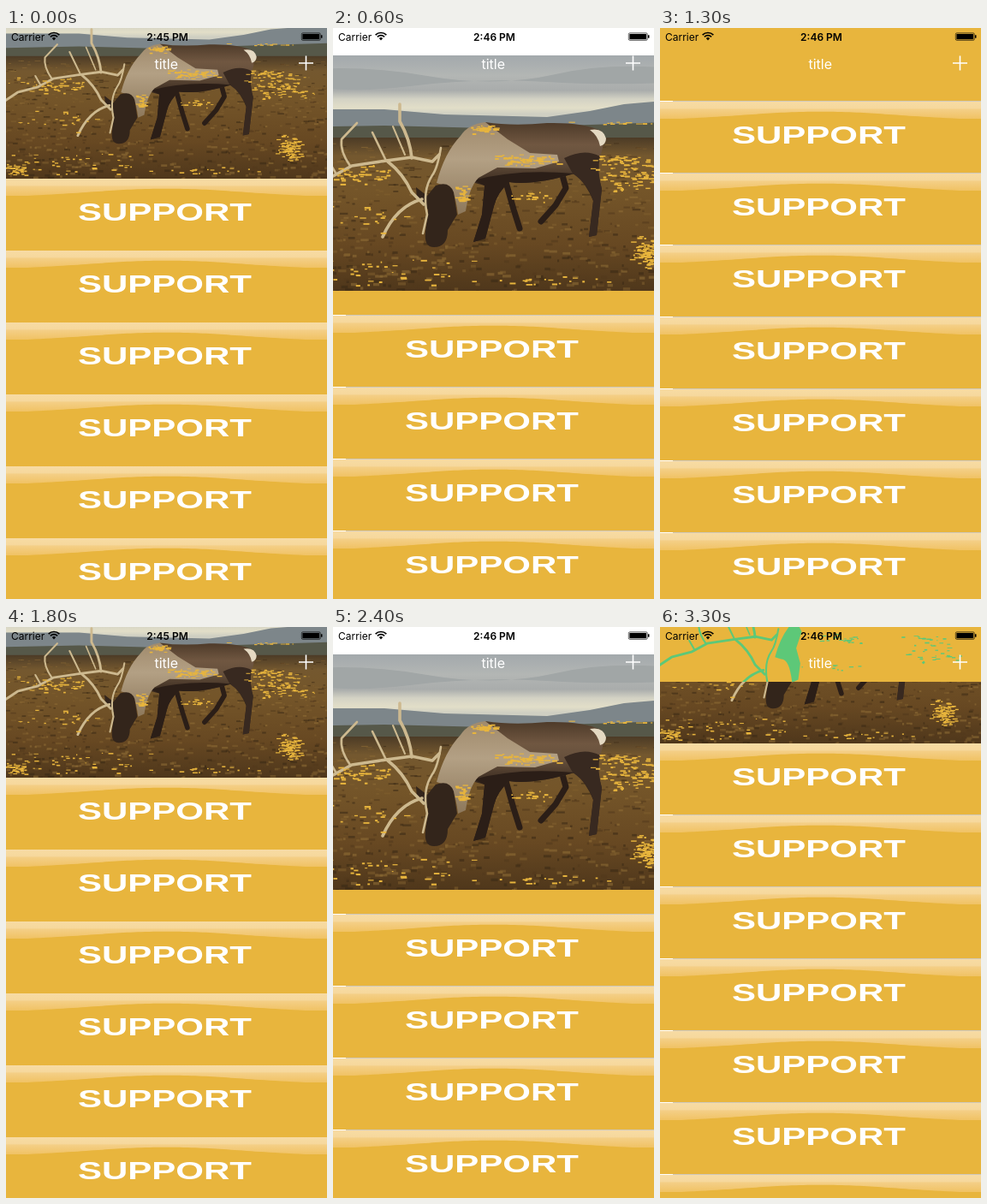
An HTML page with a canvas that plays this animation: 375x667 px, repeating every 3.4 s.

```html
<!DOCTYPE html>
<html lang="en">
<head>
<meta charset="utf-8">
<title>Stretchy header list</title>
<style>
html, body { margin: 0; width: 100%; height: 100%; overflow: hidden; background: #fff; }
canvas { display: block; width: 375px; height: 667px; }
</style>
</head>
<body>
<canvas id="stage"></canvas>
<script>
const W = 375, H = 667, ROW = 84, HEADER = 176, NAV = 64;
const STEP = 100, LOOP = 34, GOLD = '#e8b53d';
const canvas = document.getElementById('stage');
const c = canvas.getContext('2d');
const ratio = window.devicePixelRatio || 1;
canvas.width = W * ratio;
canvas.height = H * ratio;

// List offset for each step of one pull down and scroll up.
const scroll = [0, 8, 28, 50, 66, 74, 76, 40, -20, -88, -150, -190, -196, -174, -112, -40, -12, -3];

function seeded(n) {
  return () => (n = (n * 16807) % 2147483647) / 2147483647;
}

function gradient(y0, y1, stops) {
  const g = c.createLinearGradient(0, y0, 0, y1);
  stops.forEach(([at, color]) => g.addColorStop(at, color));
  return g;
}

function rect(x, y, w, h, fill) {
  c.fillStyle = fill;
  c.fillRect(x, y, w, h);
}

function shape(d, fill) {
  c.fillStyle = fill;
  c.fill(new Path2D(d));
}

function stroke(d, color, width) {
  c.strokeStyle = color;
  c.lineWidth = width;
  c.stroke(new Path2D(d));
}

function text(str, x, y, font, color, align = 'left') {
  c.font = font;
  c.fillStyle = color;
  c.textAlign = align;
  c.fillText(str, x, y);
}

const throat = 'M151 126 Q130 146 121 181 L130 184 Q142 183 146 218 L155 214 L158 190 L152 168 L160 144 Z';
const antlers = [
  ['M-48 193 L-30 181 L0 173 L22 161 L62 155 L92 151 L116 156 L124 148', 3.6],
  ['M64 156 Q82 170 92 192 L106 206', 3.6],
  ['M104 200 Q74 208 58 244', 3.6],
  ['M92 152 Q90 130 78 109 L78 89', 3.6],
  ['M62 155 L46 122', 2.6],
  ['M84 148 L70 115', 2],
  ['M20 161 Q8 144 10 130 L28 111', 2.6],
  ['M4 171 L-4 157', 2.6],
  ['M126 140 Q122 164 116 172 Q104 190 110 218 L105 240', 2.6]
];

// Centre x, centre y, half width, half height, count.
const patches = [
  [352, 172, 60, 22, 95], [330, 153, 32, 6, 25], [366, 262, 20, 19, 110],
  [20, 170, 66, 14, 55], [230, 197, 42, 7, 18], [-34, 293, 22, 10, 40],
  [60, 285, 120, 18, 45], [250, 295, 80, 8, 18], [28, 225, 70, 20, 22],
  [225, 154, 40, 7, 65], [175, 118, 18, 7, 34], [150, 198, 8, 16, 26],
  [330, 111, 70, 2, 12]
];

function flecks(color, share = 1) {
  const rnd = seeded(71);
  const spread = () => rnd() + rnd() - 1;
  c.fillStyle = color;
  for (const [x, y, rx, ry, n] of patches) {
    for (let i = 0; i < n * share; i++) {
      c.fillRect(x + spread() * rx, y + spread() * ry, 1.5 + rnd() * 6, 1 + rnd() * 1.2);
    }
  }
}

function drawAntlers(color) {
  c.lineCap = c.lineJoin = 'round';
  antlers.forEach(([d, width]) => stroke(d, color, width));
}

function drawLand() {
  rect(-50, 30, 475, 100, gradient(32, 100, [
    [0, '#a3a9ac'], [.35, '#b3b6b4'], [.6, '#a9acab'], [.75, '#d3d2c4'], [.9, '#e2dec8'], [1, '#cfcfc2']
  ]));
  shape('M-50 50 Q30 42 110 56 T260 54 T425 50 V62 Q330 68 250 63 T90 68 T-50 64Z', '#a1a6a6');
  shape('M-50 95 L60 95 L130 101 L210 103 L250 104 L300 97 L340 89 L425 82 V128 H-50Z', '#7d868a');
  shape('M-50 116 L60 114 L180 117 L300 113 L425 109 V137 H-50Z', '#565849');
  rect(-50, 128, 475, 181, gradient(128, 307, [
    [0, '#4c3b26'], [.12, '#74582f'], [.35, '#745529'], [.7, '#674822'], [1, '#4f371b']
  ]));
  const rnd = seeded(19);
  const tones = ['#3a2815', '#936f38', '#523a1d', '#80602f'];
  c.globalAlpha = .55;
  for (let i = 0; i < 900; i++) {
    const y = 134 + rnd() * 173;
    rect(-50 + rnd() * 475, y, 2 + rnd() * 8, 1 + (y - 130) / 70, tones[i % 4]);
  }
  c.globalAlpha = 1;
}

function drawDeer() {
  const dark = '#2b1e17';
  c.lineCap = c.lineJoin = 'round';
  stroke('M268 172 L272 187 L260 207 L243 226', dark, 7);
  stroke('M202 180 L211 212 L218 234', dark, 7);
  shape('M178 110 Q210 115 250 111 Q292 110 313 120 Q319 132 312 150 Q308 168 314 188 L308 242 L299 244 L304 202 Q296 182 282 170 Q235 184 206 180 Q192 192 188 208 L178 246 L164 250 L174 218 L177 184 L162 180 Q150 150 178 110Z',
    gradient(110, 185, [[0, '#4d3a29'], [.35, '#705741'], [.6, '#66503c'], [1, '#33251b']]));
  shape('M270 152 Q294 140 312 150 Q308 168 314 188 L308 242 L299 244 L304 202 Q298 182 280 170Z', '#382920');
  shape('M164 178 Q215 164 282 170 Q235 184 206 180 Q192 192 188 208 L178 246 L164 250 L174 218 L177 184Z', dark);
  shape('M178 110 Q158 112 149 126 Q130 146 121 181 L130 184 Q142 183 146 218 L155 214 Q159 186 170 175 L192 163 L236 164 L264 156 L262 148 L230 146 L204 130 Z',
    gradient(110, 218, [[0, '#a08a6c'], [.4, '#b3a084'], [1, '#8d785b']]));
  shape('M300 119 Q316 116 319 129 Q319 136 312 138 Q310 126 300 119Z', '#e4d9c2');
  shape('M120 184 Q136 178 141 192 L145 218 L134 236 Q134 256 118 256 Q106 256 108 238 L111 212 L98 200 L97 186 L110 196Z', '#33251b');
  drawAntlers('#cdb98f');
}

// Runs a drawing in photo space, scaled with the pull.
function inPhoto(off, draw) {
  const scale = .8 * (1 + Math.max(off, 0) / 304);
  c.save();
  c.translate(W / 2, off - 44);
  c.scale(scale, scale);
  c.translate(-W / 2, -32);
  c.beginPath();
  c.rect(-50, 32, 475, 275);
  c.clip();
  draw();
  c.restore();
}

function drawRow(top, off) {
  rect(0, top, W, ROW, GOLD);
  rect(0, top, W, 21, gradient(top, top + 21, [
    [0, '#f7dba4'], [.38, '#f6d89c'], [.42, '#f4cf87'], [1, '#f0c161']
  ]));
  c.save();
  c.translate(0, top);
  shape('M0 20 H25 C110 16 130 11.8 187.5 11.8 S265 16 350 20 H375 V30 H0Z', GOLD);
  c.translate(185.5, 49.3);
  c.scale(1.4, 1);
  text('SUPPORT', 0, 0, 'bold 30px "Liberation Sans", Arial, sans-serif', '#fff', 'center');
  c.restore();
  if (off) {
    rect(0, top + 83, W, 1, '#cfc8bb');
    rect(0, top + 83, 15, 1, '#fff');
  }
}

function drawNav(off) {
  if (off >= 0) return;
  c.save();
  c.beginPath();
  c.rect(0, 0, W, NAV);
  c.clip();
  c.globalAlpha = Math.min(1, -off / 40);
  rect(0, 0, W, NAV, GOLD);
  if (off > -64) {
    inPhoto(off, () => {
      const green = '#5dc878';
      shape(throat, green);
      drawAntlers(green);
      c.beginPath();
      c.rect(160, 32, 265, 170);
      c.clip();
      flecks(green, .35);
    });
  }
  c.restore();
}

function drawBar(clock) {
  const sans = 'Inter, Roboto, sans-serif';
  text('Carrier', 6, 14.5, '400 12px ' + sans, '#000');
  text(clock, 188.5, 14.5, '600 12px ' + sans, '#000', 'center');
  c.lineCap = 'butt';
  for (const r of [9, 5.8]) {
    c.beginPath();
    c.arc(56, 14.5, r, -Math.PI * .75, -Math.PI * .25);
    c.strokeStyle = '#000';
    c.lineWidth = 1.7;
    c.stroke();
  }
  shape('M56 14.5 L53.8 12 Q56 10.2 58.2 12Z', '#000');
  c.beginPath();
  c.roundRect(345.3, 5.8, 22, 8.6, 1.5);
  c.lineWidth = .6;
  c.stroke();
  rect(346.4, 6.9, 19.8, 6.4, '#000');
  rect(368, 8.3, 1.5, 3.4, '#000');
  text('title', 187.2, 48, '400 16px ' + sans, '#fff', 'center');
  stroke('M342 41 H359 M350.5 32.5 V49.5', '#fff', 1.6);
}

function draw(step) {
  const k = step % scroll.length, off = scroll[k];
  c.setTransform(ratio, 0, 0, ratio, 0, 0);
  rect(0, 0, W, H, '#fff');
  for (let top = HEADER + off; top < H; top += ROW) drawRow(top, off);
  inPhoto(off, () => {
    drawLand();
    drawDeer();
    flecks(GOLD);
  });
  drawNav(off);
  drawBar(k < 3 ? '2:45 PM' : '2:46 PM');
}

const start = performance.now();
let shown = -1;
function tick() {
  const step = Math.floor((performance.now() - start) / STEP) % LOOP;
  if (step !== shown) draw(shown = step);
  requestAnimationFrame(tick);
}
tick();
</script>
</body>
</html>
```
